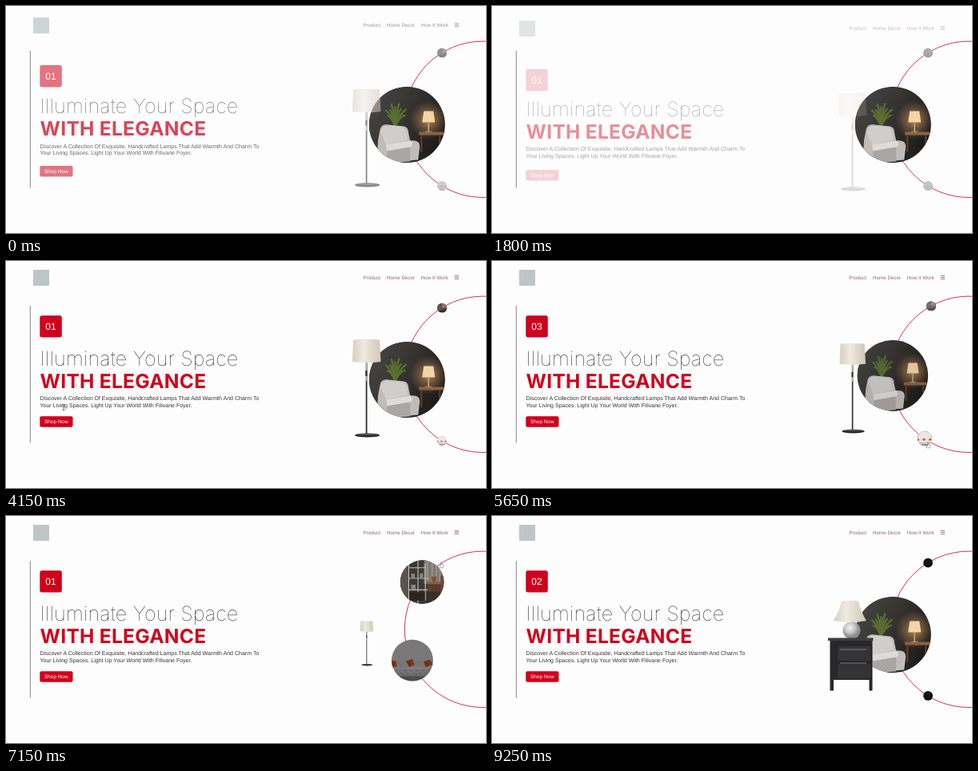
Write an HTML page that moves like this. It is 600 px wide and 284 px high and loops after 9.3 s.

```html
<!DOCTYPE html>
<html lang="en">
<head>
<meta charset="utf-8">
<title>Lamp showcase</title>
<style>
  html, body { margin: 0; width: 100%; height: 100%; overflow: hidden; background: #fefdfe; }
  svg { display: block; width: 600px; height: 284px; }
  text { font-family: "Liberation Sans", Arial, sans-serif; text-rendering: geometricPrecision; }
  .title { font-family: Montserrat, Inter, sans-serif; }
  .nav { font-size: 6.25px; fill: #8f6468; }
  .copy { font-size: 7.04px; fill: #333; }
</style>
</head>
<body>
<svg viewBox="0 0 600 284" xmlns="http://www.w3.org/2000/svg">
  <defs>
    <clipPath id="round"><circle r="47.5"/></clipPath>
    <linearGradient id="wall" x1="0" y1="0" x2="1" y2=".5">
      <stop offset="0" stop-color="#4b4a48"/><stop offset=".55" stop-color="#35322f"/><stop offset="1" stop-color="#1f1d1c"/>
    </linearGradient>
    <radialGradient id="glow">
      <stop offset="0" stop-color="#e0a868" stop-opacity=".75"/><stop offset="1" stop-color="#b08050" stop-opacity="0"/>
    </radialGradient>
    <linearGradient id="shade">
      <stop offset="0" stop-color="#d6cfc2"/><stop offset=".4" stop-color="#efeadf"/><stop offset="1" stop-color="#cfc6b7"/>
    </linearGradient>
    <radialGradient id="ball" cx=".4" cy=".35">
      <stop offset="0" stop-color="#f2f2f2"/><stop offset=".6" stop-color="#c4c5c7"/><stop offset="1" stop-color="#8c8e92"/>
    </radialGradient>

    <g id="room" clip-path="url(#round)">
      <rect x="-48" y="-48" width="96" height="96" fill="url(#wall)"/>
      <rect x="-48" y="34" width="96" height="14" fill="#252321"/>
      <circle cx="27" cy="-6" r="24" fill="url(#glow)"/>
      <g id="leaves" fill="none" stroke="#586f31" stroke-width="2.4" stroke-linecap="round"></g>
      <path d="M-34 8Q-33 -1 -24 0L-4 2Q2 3 2 11L4 20Q16 19 16 27L14 44L-28 48L-36 36Q-38 24 -34 8Z" fill="#bfbcba"/>
      <path d="M-33 9Q-31 1 -23 1L-5 3Q0 5 1 19L-26 25Z" fill="#d0cdcb"/>
      <path d="M-26 25L4 20Q9 23 5 28L-25 33Z" fill="#dedbd9"/>
      <path d="M-25 33L4 28V46L-25 48Z" fill="#a9a6a4"/>
      <path d="M21 -17H33L35 -3H19Z" fill="#f3d5a6"/>
      <path d="M27 -3V9M23 9H31" stroke="#c6a67c" stroke-width="1.6"/>
      <path d="M15 9H46V13H15Z" fill="#8b6341"/>
      <path d="M18 13V34M41 13V34" stroke="#5c422d" stroke-width="2"/>
    </g>

    <g id="sofa" clip-path="url(#round)">
      <rect x="-48" y="-48" width="96" height="96" fill="#eae7e7"/>
      <g id="specks" fill="#dcbda6"></g>
      <path d="M-48 1Q-26 -4 -22 2Q0 -4 16 2Q34 -3 48 1V48H-48Z" fill="#e0dfe2"/>
      <path d="M-24 2V16M16 2V16" stroke="#c6c5ca"/>
      <path d="M-48 15H48V21H-48Z" fill="#efeeef"/>
      <path d="M-48 21H48V38H-48Z" fill="#c9c9ce"/>
      <path d="M-34 21Q-30 32 -24 22Q-18 34 -10 22Q-4 34 4 22Q10 34 18 22Q24 33 32 21" fill="none" stroke="#f0eff1" stroke-width="2"/>
      <path d="M-48 36H48V48H-48Z" fill="#8f8b88"/>
      <path d="M-49 -1L-37 2L-35 13L-46 17ZM-14 1L0 -3L5 10L-7 15ZM26 3L39 -2L47 9L31 15Z" fill="#e65c1e"/>
      <path d="M-49 -1L-42 8L-46 17ZM-14 1L-4 6L-7 15ZM26 3L36 7L31 15Z" fill="#c9470f"/>
    </g>

    <g id="shelf" clip-path="url(#round)">
      <rect x="-48" y="-48" width="96" height="96" fill="#3d3935"/>
      <path d="M-48 -48H-30V48H-48Z" fill="#5a544e"/>
      <path d="M4 -48H48V4H4Z" fill="#7f7972"/>
      <path d="M12 -48V2M22 -48V2M31 -48V2M39 -48V2" stroke="#9b958d" stroke-width="3"/>
      <path d="M-28 -31H8M-28 -8H14M-28 17H30" stroke="#bcb8b2" stroke-width="2"/>
      <path d="M-29 -48V44M-9 -48V48M7 -40V40" stroke="#c9c6c1" stroke-width="1.8"/>
      <path d="M-24 -18H-16V-9H-24ZM-5 -19H2V-9H-5ZM-24 6H-14V16H-24Z" fill="#8d8378"/>
      <path d="M9 -1H45V5H9Z" fill="#8a5f41"/>
      <path d="M12 5H38V20H12Z" fill="#5a3d2b"/>
      <path d="M20 -12H32L30 -1H22Z" fill="#7c5238"/>
      <path d="M-28 22H6V40H-28Z" fill="#272422"/>
      <path d="M10 22H48V48H10Z" fill="#35302b"/>
      <path d="M40 -14H48V24H40Z" fill="#6b4c38"/>
    </g>

    <g id="lamp1">
      <path d="M450.6 126V217" stroke="#2e2e30" stroke-width="1.8"/>
      <path d="M450.4 127V150" stroke="#b9b9ba" stroke-width="1.4"/>
      <path d="M450.4 137V144" stroke="#333" stroke-width="2.2"/>
      <ellipse cx="451.6" cy="218" rx="15.5" ry="2.6" fill="#252527"/>
      <ellipse cx="451.6" cy="217" rx="13.5" ry="1" fill="#57575a"/>
      <path d="M434 98.5Q451 97 467 98.5L468.5 126Q451 128.5 433 126Z" fill="url(#shade)"/>
    </g>
    <g id="lamp2">
      <path d="M450.6 126V215" stroke="#2e2e30" stroke-width="1.8"/>
      <path d="M450.4 127V145" stroke="#aaa" stroke-width="1.3"/>
      <ellipse cx="450.6" cy="216.3" rx="15.5" ry="2.6" fill="#252527"/>
      <ellipse cx="450.6" cy="215.3" rx="13.5" ry="1" fill="#57575a"/>
      <path d="M440 96.5Q450 95 459 96.500Q462 113 470.500 125.500Q449 129 427 125.500Q436 113 440 96.500Z" fill="url(#shade)"/>
      <path d="M443 97L434 126M446.500 97L441.500 127M450 97V127M453 97L457.500 127M456.500 97L465 126" stroke="#c6bdad" stroke-width=".5"/>
    </g>
    <g id="lamp3">
      <path d="M446 130H453V136H446Z" fill="#a5a6a8"/>
      <circle cx="449.5" cy="143" r="11" fill="url(#ball)"/>
      <path d="M437 106.5Q447 105 458 106.5Q461 120 468 131Q448 135 426.5 131Q434 120 437 106.5Z" fill="url(#shade)"/>
      <path d="M420 152.5H476.5V156H420Z" fill="#3d3d40"/>
      <path d="M422.5 156H475.5V218.5H471.5V205H427V218.5H422.5Z" fill="#28282a"/>
      <path d="M431 162H474V182H431ZM431 184H474V204H431Z" fill="#343437" stroke="#1b1b1d" stroke-width=".7"/>
      <path d="M435 167H468M435 184H468" stroke="#99999b" stroke-width=".8"/>
    </g>

    <path id="arrow" d="M0 0V5.6L1.4 4.4L2.3 6.3L3.2 5.9L2.3 4H4Z" fill="#fff" stroke="#444" stroke-width=".6"/>
    <path id="hand" d="M-.6 0Q0 -.8 .6 0V2.4L2.8 3V5.2L2.2 6.8H-1.4L-2.6 4.2L-2 3.600L-.6 4.500Z" fill="#fff" stroke="#555" stroke-width=".5"/>
    <path id="beam" d="M-1.6 -3.5H1.6M0 -3.5V3.5M-1.6 3.5H1.6" fill="none" stroke="#555" stroke-width=".8"/>
  </defs>

  <rect width="600" height="284" fill="#fefdfe"/>
  <g id="page">
    <path d="M30.3 56V227.5" stroke="#8a8587"/>
    <circle cx="596" cy="141.8" r="97.7" fill="none" stroke="#d42a48" stroke-width=".95"/>
    <g id="ring"></g>

    <g class="early">
      <rect x="34" y="11" width="20" height="20" fill="#bcc6c9"/>
      <text class="nav" x="446.5" y="22.6">Product</text>
      <text class="nav" x="476" y="22.6">Home Decor</text>
      <text class="nav" x="518.7" y="22.6">How It Work</text>
      <path d="M560.7 18.4H566M560.7 20.4H566M560.7 22.4H566" stroke="#a8525e" stroke-width=".8"/>
      <text class="title" x="42.5" y="131" font-size="25.2" font-weight="100" letter-spacing=".15" fill="#222">Illuminate Your Space</text>
      <text class="title" x="42.5" y="158.6" font-size="24.5" font-weight="700" letter-spacing=".3" fill="#d0021b">WITH ELEGANCE</text>
      <text class="copy" x="42.5" y="174.2">Discover A Collection Of Exquisite, Handcrafted Lamps That Add Warmth And Charm To</text>
      <text class="copy" x="42.5" y="182.5">Your Living Spaces. Light Up Your World With Filivane Foyer.</text>
    </g>

    <g class="late">
      <rect x="42.3" y="68.2" width="27.5" height="27.4" rx="2.5" fill="#d0021b"/>
      <text id="count" x="56" y="85.9" font-size="12" fill="#fff" text-anchor="middle">01</text>
      <rect x="42.3" y="194.2" width="41.2" height="13.500" rx="2" fill="#d0021b"/>
      <text x="62.800" y="203.100" font-size="6.400" fill="#fff" text-anchor="middle">Shop Now</text>
      <use id="lamp" href="#lamp1"/>
    </g>
  </g>
  <use id="cursor" href="#arrow"/>
</svg>

<script>
const LOOP = 9300, RELOAD = 1500, SHOWN = 1700;
const $ = s => document.querySelector(s);
const svgEl = (name, attrs, parent) => {
  const el = document.createElementNS('http://www.w3.org/2000/svg', name);
  set(el, attrs);
  return parent.appendChild(el);
};
const set = (el, attrs) => { for (const k in attrs) el.setAttribute(k, attrs[k]); };
const clamp = x => Math.max(0, Math.min(1, x));
const mix = (a, b, p) => a + (b - a) * p;
const easeOut = x => 1 - (1 - clamp(x)) ** 2;

// plant and wallpaper
for (let i = 0; i < 9; i++) {
  const a = (-165 + i * 19) * Math.PI / 180, len = 12 + (i * 5) % 9;
  const c = Math.cos(a) * len, s = Math.sin(a) * len;
  svgEl('path', { d: `M-15 2Q${-15 + .4 * c} ${-8 + .7 * s} ${-15 + .8 * c} ${-8 + s}` }, $('#leaves'));
}
for (let y = -44; y < -2; y += 6)
  for (let x = -45 + (y & 4); x < 48; x += 8) svgEl('circle', { cx: x, cy: y, r: .7 }, $('#specks'));

// ring items: angles are degrees below the horizontal
const MID = 4, SIDE = 58.5, BIG = 47.5, SMALL = 6;
const discs = [0, 1, 2, 3].map(() => {
  const g = svgEl('g', {}, $('#ring'));
  return { g, base: svgEl('circle', { r: BIG - .5 }, g), pic: svgEl('use', {}, g) };
});

function place(disc, angle, size, pic, picAlpha, alpha = 1, base = '#111') {
  const a = angle * Math.PI / 180, orbit = mix(97.5, 95, size);
  const x = 596 - orbit * Math.cos(a), y = 141.8 + orbit * Math.sin(a);
  const s = mix(SMALL, BIG, size) / BIG;
  set(disc.g, { transform: `translate(${x} ${y}) scale(${s})`, opacity: alpha });
  set(disc.base, { fill: base });
  set(disc.pic, { href: '#' + pic, opacity: picAlpha });
}

// from: -1 = the upper item comes in, 1 = the lower one
const moves = [
  { at: 5590, from: 1, out: 'room', pic: 'sofa', count: '03', lamp: 2, lampEnd: 1000 },
  { at: 6740, from: -1, out: 'sofa', pic: 'shelf', count: '01', lamp: 1, lampEnd: 1220 },
  { at: 7990, from: -1, out: 'shelf', pic: 'room', count: '02', lamp: 3, lampEnd: 1100 }
];

function drawRest(phase) {
  const shown = mix(.2, 1, clamp((phase - 200) / 700));
  place(discs[0], -SIDE, 0, 'shelf', shown, 1, '#bdbdbd');
  place(discs[1], SIDE, 0, 'sofa', shown, 1, '#bdbdbd');
  place(discs[2], MID, 1, 'room', 1);
  place(discs[3], MID, 0, 'room', 0, 0);
  $('#count').textContent = '01';
  set($('#lamp'), { href: '#lamp1', transform: '' });
}

function drawMove(m, t) {
  const e = t - m.at, first = m === moves[0];
  const upper = clamp(e / 1250), lower = clamp(e / 1130), size = clamp(e / 800);
  const pIn = m.from > 0 ? lower : upper, pOut = m.from > 0 ? upper : lower;
  const side = m.from * SIDE;
  place(discs[0], -side - m.from * 54 * pOut, 0, 'shelf', first ? 1 : 0, 1 - clamp(e / 400));
  place(discs[1], side, 0, m.pic, 0, clamp((upper - .85) / .12));
  place(discs[2], mix(MID, -side, pOut), 1 - size, m.out, 1 - size);
  place(discs[3], mix(side, MID, pIn), size, m.pic, first ? 1 : clamp(size * 2));
  $('#count').textContent = m.count;

  const prev = first ? 1 : moves[moves.indexOf(m) - 1].lamp, swap = 400;
  const s = e < swap ? mix(1, .45, e / swap) : mix(.45, 1, clamp((e - swap) / (m.lampEnd - swap)));
  set($('#lamp'), {
    href: '#lamp' + (e < swap ? prev : m.lamp),
    transform: `translate(451 159.5) scale(${s}) translate(-451 -159.5)`
  });
}

// pointer stops: time, x, y
const trail = [
  [2750, 70, -12], [3200, 22, 130], [3600, 34, 262], [4150, 72, 183], [4550, 62, 186],
  [5000, 260, 205], [5450, 545, 227], [5900, 545, 227], [6600, 529, 79], [6720, 544, 58],
  [7200, 544, 58], [7750, 546.5, 94.5], [7950, 544, 58], [8300, 544, 58], [8750, 606, 40]
];
const over = (t, a, b) => t >= a && t < b;

function drawCursor(t) {
  const i = trail.findIndex(p => p[0] > t);
  const el = $('#cursor');
  if (i < 1) return set(el, { visibility: 'hidden' });
  const [a, b] = [trail[i - 1], trail[i]], u = (t - a[0]) / (b[0] - a[0]);
  const p = u * u * (3 - 2 * u);
  const hand = over(t, 5400, 5960) || over(t, 6560, 7350) || over(t, 7880, 8380);
  set(el, {
    visibility: 'visible',
    href: hand ? '#hand' : over(t, 4060, 4650) ? '#beam' : '#arrow',
    transform: `translate(${mix(a[1], b[1], p)} ${mix(a[2], b[2], p)})`
  });
}

function draw(t) {
  const phase = t < RELOAD ? t + 390 : t - 1600;
  set($('#page'), { visibility: over(t, RELOAD, SHOWN) ? 'hidden' : 'visible' });
  for (const [sel, lag] of [['.early', 0], ['.late', 130]]) {
    const p = easeOut((phase - lag) / 800);
    set($(sel), { opacity: p, transform: `translate(0 ${13 * (1 - p)})` });
  }
  const move = moves.filter(m => m.at <= t).pop();
  move ? drawMove(move, t) : drawRest(phase);
  drawCursor(t);
}

const start = performance.now();
function tick() {
  draw((performance.now() - start) % LOOP);
  requestAnimationFrame(tick);
}
draw(0);
requestAnimationFrame(tick);
</script>
</body>
</html>
```
